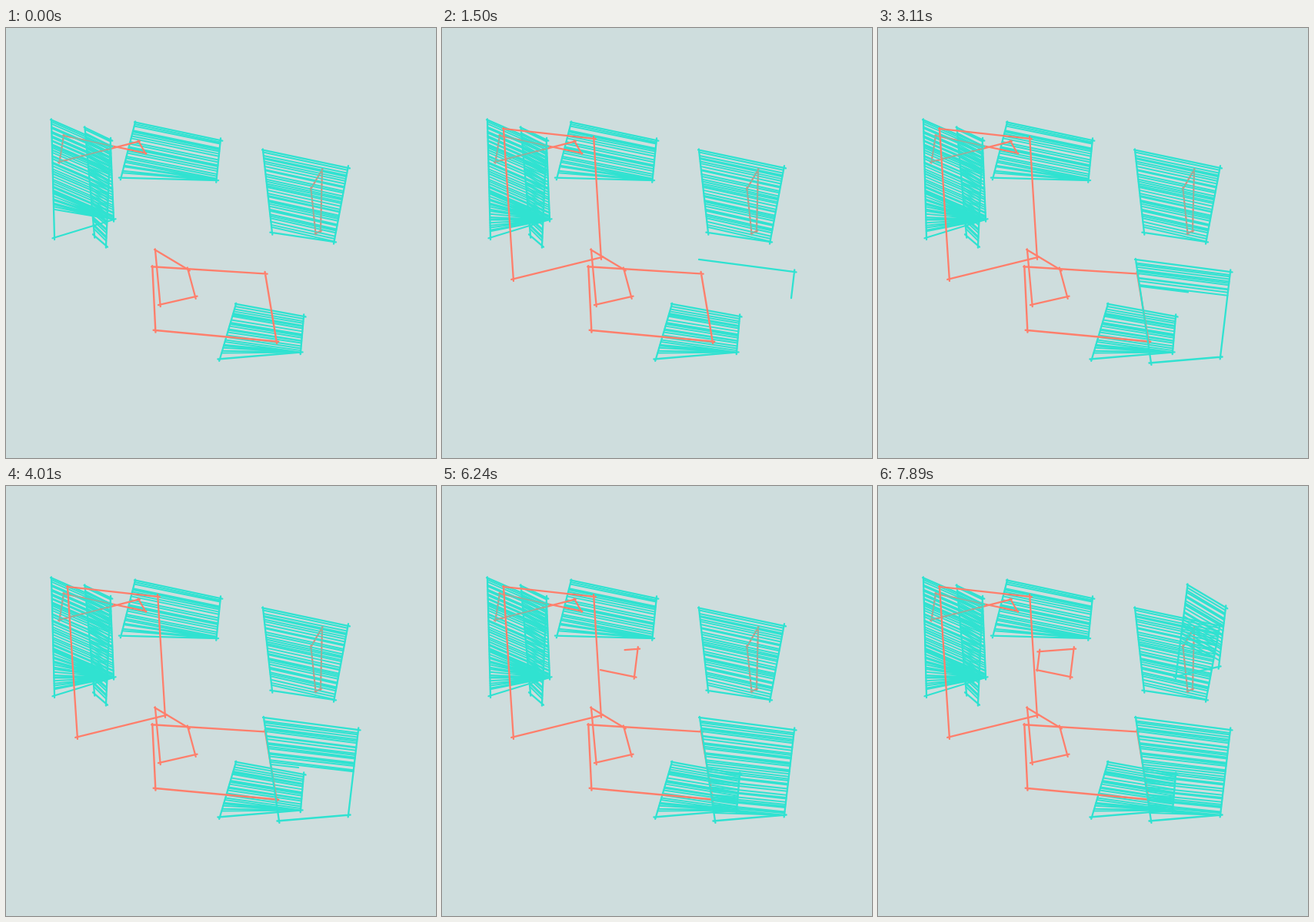
These frames come from a looping animation (559 px wide and 559 px high, 8000 ms). An HTML page with a canvas:

```html
<!DOCTYPE html>
<html lang="en">
<head>
<meta charset="utf-8">
<title>Hatched quads</title>
<style>
  html, body { margin: 0; width: 100%; height: 100%; overflow: hidden; background: #cedddd; }
  canvas { display: block; }
</style>
</head>
<body>
<canvas id="stage" width="559" height="559"></canvas>
<script>
const ctx = document.getElementById('stage').getContext('2d');
const LOOP = 8000, STEP = 150;
const BG = '#cedddd', TEAL = '#30e2d1', CORAL = '#ff7f6c', FADED = '#b3a08f';

function random(seed) {
  let s = seed * 7919 + 17;
  return () => (s = (s * 16807) % 2147483647) / 2147483647;
}

const mix = (a, b, k) => [a[0] + (b[0] - a[0]) * k, a[1] + (b[1] - a[1]) * k];

// Move away from a by d pixels beyond b.
function beyond(a, b, d) {
  const len = Math.hypot(b[0] - a[0], b[1] - a[1]);
  return mix(a, b, 1 + d / len);
}

// Four sides, each overshooting its corners a little.
function outline(quad, over = 2.6) {
  return quad.map((p, i) => {
    const q = quad[(i + 1) % 4];
    return [beyond(q, p, i ? over : 1), beyond(p, q, i < 3 ? over : 1)];
  });
}

// Lines from the left side to the right side; the right end stops at its corner.
function hatch(quad, step, ratio, seed, margin = 7) {
  const [tl, tr, br, bl] = quad, rnd = random(seed);
  const left = bl[1] - tl[1], right = br[1] - tr[1], lines = [];
  for (let i = 1; i * step < left - margin; i++) {
    const y = (i + (rnd() - 0.5) * 0.9) * step;
    const r = Math.min(right, y * ratio + (rnd() - 0.5));
    lines.push([mix(tl, bl, y / left), mix(tr, br, r / right)]);
  }
  return lines;
}

// Draw the first part of a list of strokes, as a pen at constant speed would.
function draw(lines, color, width, part = 1) {
  if (part <= 0) return;
  const size = ([a, b]) => Math.hypot(b[0] - a[0], b[1] - a[1]);
  let rest = lines.reduce((sum, l) => sum + size(l), 0) * Math.min(1, part) + 0.01;
  ctx.strokeStyle = color;
  ctx.lineWidth = width;
  ctx.beginPath();
  for (const line of lines) {
    if (rest <= 0) break;
    const len = size(line);
    const end = mix(line[0], line[1], Math.min(1, rest / len));
    ctx.moveTo(...line[0]);
    ctx.lineTo(...end);
    rest -= len;
  }
  ctx.stroke();
}

const quads = {
  tall:   [[59, 119.5], [136, 153], [140, 249], [63, 272.5]],
  narrow: [[102.5, 129.5], [136, 145.5], [130, 283], [115, 270]],
  top:    [[168, 122.5], [278.8, 146], [273.5, 198], [149.5, 194.7]],
  right:  [[334, 158.5], [444.5, 181.8], [426.5, 278], [346, 266]],
  low:    [[299, 358.7], [387, 375], [383, 421.5], [278, 430.3]],
  big:    [[335, 301], [458, 317], [445, 427.7], [355, 435.3]],
  upper:  [[402.5, 128.5], [452, 158], [443, 235], [387.3, 247.5]]
};

const bow = outline([[75, 140], [181, 162.5], [172.5, 147.5], [69.5, 174]], 1.5);
const sliver = outline([[411, 184], [409, 264], [402.5, 267], [396.5, 209]], 1.5);
const kite = outline([[194, 288.5], [236.5, 314], [246, 349.3], [200.5, 359.5]]);
const wide = outline([[190.3, 310.3], [337, 319.5], [351.7, 407.5], [194.3, 393]]);
const frame = outline([[80, 131], [197.3, 143.8], [206.8, 298.2], [92.8, 326.3]]);
const small = outline([[207, 239.3], [250, 248], [254.5, 211.8], [210, 215.2]]);

const done = [
  ['top', 3.1, 1, 5],
  ['narrow', 3.2, 1, 3],
  ['right', 3.1, 0.95, 8],
  ['low', 2.9, 0.95, 11]
].map(([name, step, ratio, seed]) => ({
  name, lines: outline(quads[name]), fill: hatch(quads[name], step, ratio, seed)
}));

const tallSides = outline(quads.tall);
const tallFill = hatch(quads.tall, 2.85, 1, 21);

// Strokes, colour, width, start and end time.
const acts = [
  [frame, CORAL, 2.3, 750, 1340],
  [outline(quads.big), TEAL, 2.3, 1340, 1806],
  [hatch(quads.big, 3.2, 0.94, 31), TEAL, 2, 1806, 6141],
  [small, CORAL, 2.3, 6141, 6293],
  [outline(quads.upper), TEAL, 2.3, 6293, 6612],
  [hatch(quads.upper, 3.4, 1, 42), TEAL, 2, 6612, 8558]
];

// Coral strokes glimpsed through the hatching.
function ghost(lines, quad) {
  ctx.save();
  ctx.beginPath();
  quad.forEach(p => ctx.lineTo(...p));
  ctx.clip();
  ctx.globalAlpha = 0.8;
  draw(lines, FADED, 1.6);
  ctx.restore();
}

function paint(t) {
  ctx.fillStyle = BG;
  ctx.fillRect(0, 0, 559, 559);
  for (const d of done) {
    draw(d.lines, TEAL, 2.3);
    draw(d.fill, TEAL, 2);
    if (d.name === 'top') {
      draw(bow, CORAL, 2.2);
      draw(sliver, CORAL, 2.2);
    }
  }
  draw(kite, CORAL, 2.3);
  draw(wide, CORAL, 2.4);
  draw(tallSides, TEAL, 2.3);
  draw(tallFill, TEAL, 2, (t + 3195) / 3940);
  ghost(bow, quads.tall);
  ghost(sliver, quads.right);
  for (const [lines, color, width, from, to] of acts) {
    draw(lines, color, width, (t - from) / (to - from));
  }
}

// The picture is held in steps, with three slightly shorter ones.
function hold(t) {
  const shift = t < 2060 ? 0 : t < 4150 ? 40 : t < 5190 ? 50 : 60;
  return Math.floor((t + shift) / STEP) * STEP - shift;
}

ctx.lineCap = 'round';
const begin = performance.now();
function tick() {
  paint(hold((performance.now() - begin) % LOOP));
  requestAnimationFrame(tick);
}
tick();
</script>
</body>
</html>
```
